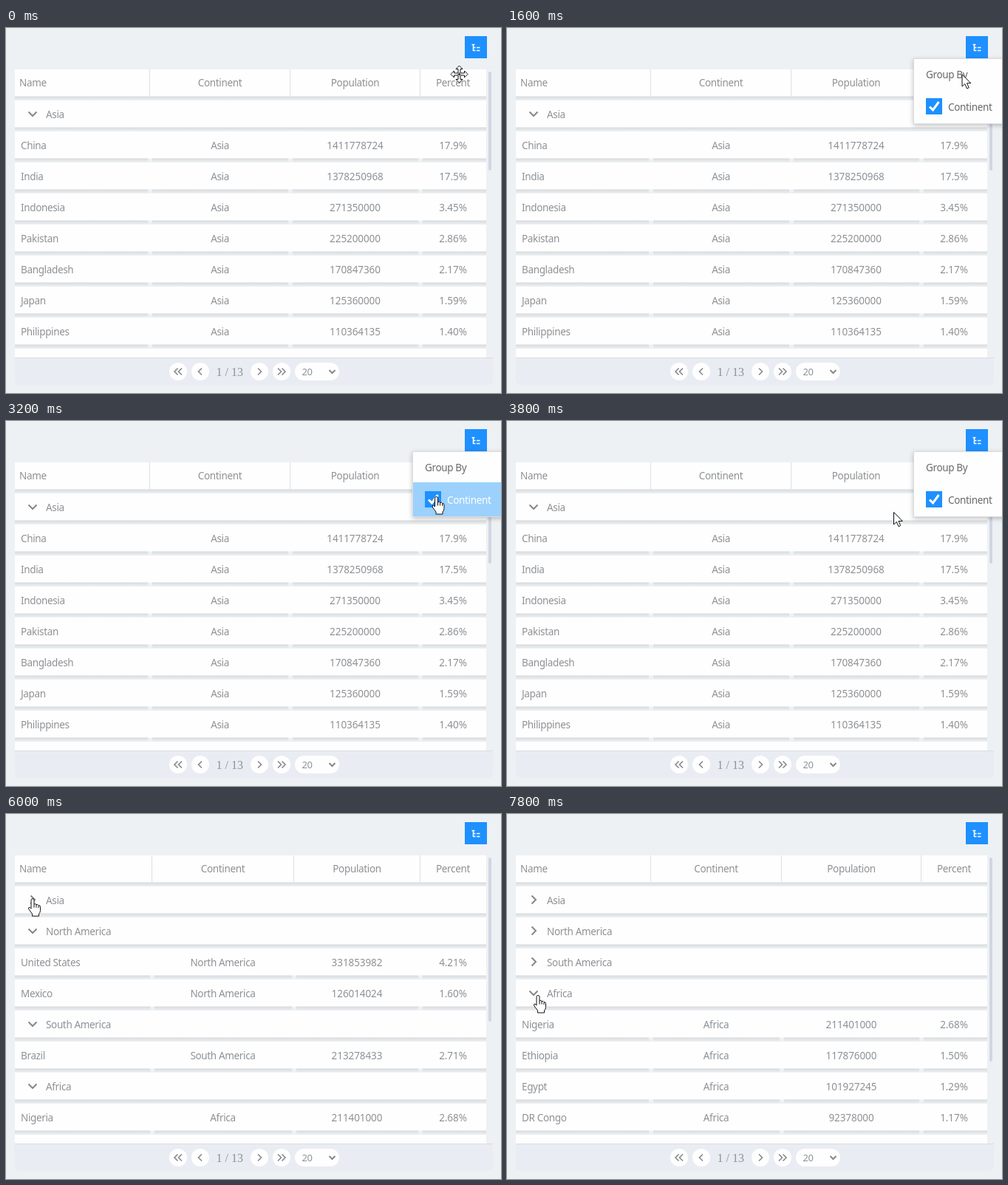
An HTML page for the animation above (8000 ms loop, 670 by 494 pixels).

```html
<!DOCTYPE html>
<html>
<head>
<meta charset="utf-8">
<style>
html, body { margin: 0; width: 100%; height: 100%; overflow: hidden; background: #edf1f4; }
svg { display: block; }
text { font: 13.5px "Noto Sans", "Open Sans", sans-serif; letter-spacing: -.35px; fill: #8e9195; }
.num { letter-spacing: -.08px; }
.mid { text-anchor: middle; }
.line { fill: none; stroke: #85888c; stroke-width: 2; }
.page { font: 16px "Liberation Serif", serif; letter-spacing: 0; }
.size { font-size: 13px; }
.cur { fill: #fff; stroke: #111; stroke-width: 1; stroke-linejoin: round; }
</style>
</head>
<body>
<svg id="stage" width="670" height="494" viewBox="0 0 670 494">
  <defs>
    <linearGradient id="shade" x1="0" y1="0" x2="0" y2="1">
      <stop offset="0" stop-color="#d5d8da"/>
      <stop offset=".5" stop-color="#e2e5e8"/>
      <stop offset="1" stop-color="#edf1f4"/>
    </linearGradient>
    <clipPath id="view"><rect x="0" y="0" width="670" height="446"/></clipPath>
    <filter id="drop" x="-10%" y="-10%" width="120%" height="130%">
      <feDropShadow dx="0" dy="2" stdDeviation="3" flood-color="#000" flood-opacity=".24"/>
    </filter>
  </defs>
  <rect width="670" height="494" fill="#edf1f4"/>
  <g id="table" clip-path="url(#view)"></g>
  <g id="pager"></g>
  <g id="tool"></g>
  <g id="menu"></g>
  <g id="cursor"></g>
</svg>
<script>
const LOOP = 8000, STEP = 200, TOP = 98, PITCH = 42, RIGHT = 650;
const el = id => document.getElementById(id);

const country = (name, area, people, share) => ({ name, area, people, share });
const china = country("China", "Asia", "1411778724", "17.9%");
const india = country("India", "Asia", "1378250968", "17.5%");
const usa = country("United States", "North America", "331853982", "4.21%");
const indonesia = country("Indonesia", "Asia", "271350000", "3.45%");
const pakistan = country("Pakistan", "Asia", "225200000", "2.86%");
const brazil = country("Brazil", "South America", "213278433", "2.71%");
const nigeria = country("Nigeria", "Africa", "211401000", "2.68%");
const bangladesh = country("Bangladesh", "Asia", "170847360", "2.17%");
const japan = country("Japan", "Asia", "125360000", "1.59%");
const philippines = country("Philippines", "Asia", "110364135", "1.40%");
const mexico = country("Mexico", "North America", "126014024", "1.60%");
const ethiopia = country("Ethiopia", "Africa", "117876000", "1.50%");
const egypt = country("Egypt", "Africa", "101927245", "1.29%");
const congo = country("DR Congo", "Africa", "92378000", "1.17%");

const groups = [
  ["Asia", [china, india, indonesia, pakistan, bangladesh, japan, philippines]],
  ["North America", [usa, mexico]],
  ["South America", [brazil]],
  ["Africa", [nigeria, ethiopia, egypt, congo]]
];
const flat = [china, india, usa, indonesia, pakistan, brazil, nigeria, bangladesh];

// Start time, number of closed groups (-1: ungrouped), column edges, thumb end
const views = [
  [0, 0, 195, 385, 193],
  [2600, -1, 198, 390, 238],
  [3200, 0, 195, 385, 193],
  [5800, 1, 198, 390, 281],
  [7000, 2, 198, 390, 307],
  [7400, 3, 195, 372, 335]
];

const path = [
  [0, 613.5, 62.5, "move"], [400, 634, 34, "arrow"], [1200, 629.5, 39.5, "arrow"],
  [1400, 626, 48, "arrow"], [2000, 596, 92, "hand"], [2400, 582.5, 102.5, "hand"],
  [3200, 582.5, 102.5, "hand"], [3600, 556, 113, "hand"], [3800, 523.5, 123.5, "arrow"],
  [4200, 490, 125, "arrow"], [5000, 76.5, 124.5, "arrow"], [5400, 58, 120, "arrow"],
  [5600, 36, 114, "hand"], [6200, 36, 115, "hand"], [6600, 34, 150, "hand"],
  [6800, 34.5, 153.5, "hand"], [7000, 34.5, 154, "hand"], [7200, 36, 194, "hand"],
  [7400, 36, 196, "hand"], [7600, 39, 236, "hand"], [7800, 42, 245.5, "hand"]
];

const rect = (x, y, w, h, fill, more = "") =>
  `<rect x="${x}" y="${y}" width="${w}" height="${h}" fill="${fill}" ${more}/>`;
const text = (x, y, s, cls = "", more = "") =>
  `<text x="${x}" y="${y}" class="${cls}" ${more}>${s}</text>`;
const line = (d, more = "") => `<path class="line" d="${d}" ${more}/>`;

function bar(y, edges) {
  let out = "";
  for (let i = 1; i < edges.length; i++) {
    const x = edges[i - 1] + (i > 1 ? 3 : 0);
    out += rect(x, y + 36, edges[i] - x - (i < edges.length - 1 ? 3 : 0), 6, "url(#shade)");
  }
  return out + rect(12, y, RIGHT - 12, 36.4, "#fefefe");
}

function drawTable([, closed, c1, c2, thumbEnd]) {
  const edges = [12, c1, c2, 561, RIGHT];
  const mid = i => (edges[i] + edges[i + 1]) / 2 - .5;
  let out = bar(56, [12, RIGHT]) + text(18, 79, "Name");
  ["Continent", "Population", "Percent"].forEach((s, i) => {
    out += rect(edges[i + 1] - 1, 56, 1, 36, "#dcdfe2") + text(mid(i + 1), 79, s, "mid");
  });

  let rows = flat;
  if (closed >= 0) {
    rows = [];
    groups.forEach(([title, list], i) => {
      const open = i >= closed;
      rows.push({ title, open });
      if (open) rows.push(...list);
    });
  }
  for (let i = 0; i < 9; i++) {
    const y = TOP + i * PITCH, r = rows[i];
    out += bar(y, r && r.title ? [12, RIGHT] : edges);
    if (!r || i > 7) continue;
    const base = y + 24;
    if (r.title) {
      const d = r.open ? `M30.5 ${y + 15.5}l5.5 5.5 5.5-5.5` : `M33.5 ${y + 12.5}l5.5 5.5-5.5 5.5`;
      out += line(d) + text(54, base, r.title);
    } else {
      out += text(20, base, r.name) + text(mid(1), base, r.area, "mid") +
        text(mid(2), base, r.people, "mid num") + text(mid(3), base, r.share, "mid num");
    }
  }
  return out + rect(653, 59, 4, thumbEnd - 59, "#d2d6e1", 'rx="2"');
}

function drawPager() {
  let out = '<path d="M12 446H659V475Q659 483 651 483H20Q12 483 12 475Z" fill="#e9ecf3"/>' +
    rect(12, 446, 647, 1, "#d9dce1");
  for (const x of [233, 263, 343, 373]) out += `<circle cx="${x}" cy="465" r="12" fill="#fefefe"/>`;
  const chev = (x, dir) => line(`M${x - dir * 2} 460.5l${dir * 4.5} 4.5 ${-dir * 4.5} 4.5`, 'style="stroke-width:1.6"');
  out += chev(230.5, -1) + chev(236, -1) + chev(263, -1) + chev(343, 1) + chev(370, 1) + chev(375.5, 1);
  return out + text(284.5, 471, "1 / 13", "page") + rect(391, 453, 60, 24, "#fefefe", 'rx="12"') +
    text(400.5, 470, "20", "size") + line("M437.5 463l4 4 4-4");
}

function drawTool() {
  return rect(621, 11, 30, 30, "#1e90ff") +
    '<path d="M630.5 22.5h4M632.5 22v9M632.5 26.5h3M632.5 30.5h3M637 26.5h4.5M637 30.5h4.5" fill="none" stroke="#fff" stroke-width="1.5"/>';
}

function drawMenu(checked, hover) {
  let out = rect(550.5, 41.5, 130, 88, "#fefefe", 'filter="url(#drop)" stroke="#dadde0"');
  if (hover) out += rect(551, 83, 119, 46, "#9bd1fc");
  out += text(567, 68, "Group By", "", 'style="fill:#66696c"') +
    text(597, 112, "Continent", "", `style="fill:${hover ? "#fff" : "#66696c"}"`);
  return out + (checked
    ? rect(567, 95, 22, 22, "#1e90ff") + '<path d="M572 106.5l4.5 4.5L584.5 100" fill="none" stroke="#fff" stroke-width="3"/>'
    : rect(567.5, 95.5, 21, 21, "#fefefe", 'stroke="#c8ccd0"'));
}

const arm = "M-1.5-1.5V-7H-4.5L0-11.5 4.5-7H1.5V-1.5";
const shapes = {
  arrow: '<path class="cur" d="M0 0V16.5L3.8 13 6.5 19.3 9.2 18.1 6.5 12H11.8Z"/>',
  hand: '<path class="cur" d="M-2 2Q-2 0 0 0T2 2V7.5Q4 6 5 8Q7 7 8 9Q10.5 8.5 10.5 11.5V16Q10.3 19 8.5 20.5V23.5H-.5V20.5L-5 14.5Q-6.5 11.5-4 11.5L-2 13.5Z"/>' +
    '<path d="M2 7.5V12M5 8V12M8 9.5V12.5" stroke="#111" fill="none"/>',
  move: [0, 90, 180, 270].map(a => `<path class="cur" d="${arm}" transform="rotate(${a})"/>`).join("") +
    '<path d="M-2 0H2M0-2V2" stroke="#111"/>'
};

function cursorAt(t) {
  let i = 0;
  while (i < path.length - 1 && path[i + 1][0] <= t) i++;
  const a = path[i], b = path[i + 1] || a;
  const k = b === a ? 0 : (t - a[0]) / (b[0] - a[0]);
  return { x: a[1] + (b[1] - a[1]) * k, y: a[2] + (b[2] - a[2]) * k, kind: a[3] };
}

let shownView;
function draw(t) {
  const view = views.filter(v => v[0] <= t).pop();
  const c = cursorAt(t), kind = c.kind === "move" && c.y < 56 ? "arrow" : c.kind;
  if (view !== shownView) el("table").innerHTML = drawTable(shownView = view);
  const open = t >= 600 && t < 4400;
  const hover = c.x > 550 && c.y >= 83 && c.y < 129;
  el("menu").innerHTML = open ? drawMenu(view[1] >= 0, hover) : "";
  el("cursor").innerHTML = `<g transform="translate(${c.x} ${c.y})">${shapes[kind]}</g>`;
}

el("pager").innerHTML = drawPager();
el("tool").innerHTML = drawTool();
const start = performance.now();
let last = -1;
function tick() {
  const t = Math.floor((performance.now() - start) % LOOP / STEP) * STEP;
  if (t !== last) draw(last = t);
  requestAnimationFrame(tick);
}
tick();
</script>
</body>
</html>
```
